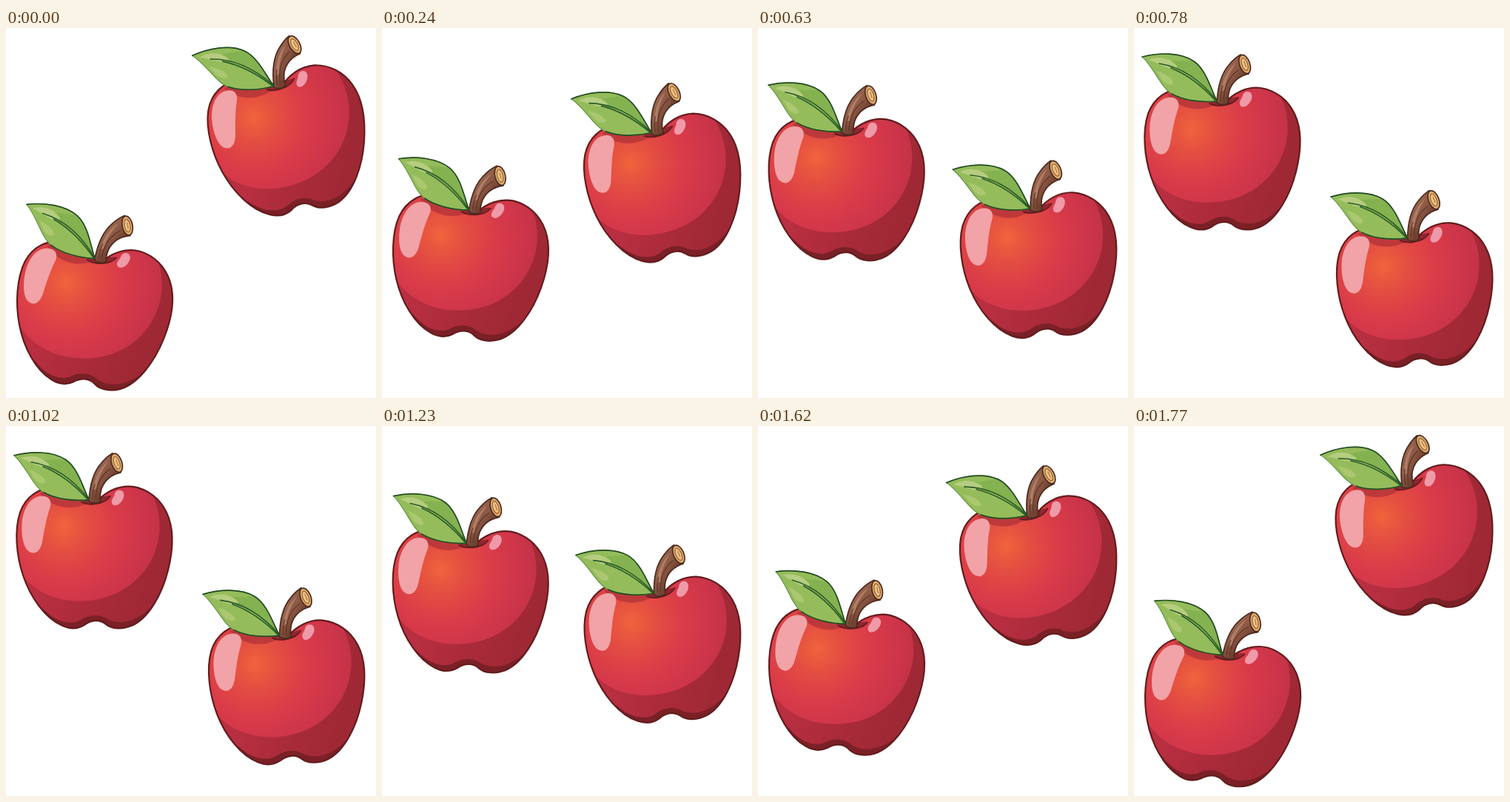
An HTML page for the animation above (1.8 s loop, 500 by 500 pixels).

```html
<!DOCTYPE html>
<html lang="en">
<head>
<meta charset="utf-8">
<title>Bouncing apples</title>
<style>
  html, body { margin: 0; width: 100%; height: 100%; overflow: hidden; background: #fff; }
  svg { display: block; width: 100vw; height: 100vh; }
</style>
</head>
<body>
<svg viewBox="0 0 500 500">
  <defs>
    <radialGradient id="skin" gradientUnits="userSpaceOnUse" cx="78" cy="136" r="148">
      <stop offset="0" stop-color="#f0643d"/>
      <stop offset=".1" stop-color="#ea593e"/>
      <stop offset=".27" stop-color="#e24a43"/>
      <stop offset=".5" stop-color="#d93b49"/>
      <stop offset=".75" stop-color="#cd354a"/>
      <stop offset="1" stop-color="#bb3047"/>
    </radialGradient>
    <linearGradient id="shade" gradientUnits="userSpaceOnUse" x1="50" y1="205" x2="185" y2="250">
      <stop offset="0" stop-color="#b92f42"/>
      <stop offset=".5" stop-color="#ab2b3b"/>
      <stop offset="1" stop-color="#9f2835"/>
    </linearGradient>
    <linearGradient id="bark" gradientUnits="userSpaceOnUse" x1="116" y1="62" x2="138" y2="78">
      <stop offset="0" stop-color="#9a6650"/>
      <stop offset=".55" stop-color="#8c5844"/>
      <stop offset="1" stop-color="#70412f"/>
    </linearGradient>
    <path id="body" d="M121 103 C108 92 86 84 66 83 C45 82 27 94 19 116
      C11 140 14 174 23 201 C33 231 53 259 76 269 C87 274 98 273 106 268
      C115 261 127 260 135 267 C143 274 158 274 170 269 C193 259 211 226 219 194
      C226 166 227 137 217 116 C208 97 191 84 171 81 C153 79 135 87 121 103Z"/>
    <path id="blade" d="M11 39 C34 33 63 33 81 45 C97 56 104 82 112 99
      C91 101 67 98 51 89 C36 80 28 55 11 39Z"/>
    <clipPath id="inBody"><use href="#body"/></clipPath>
    <clipPath id="inLeaf"><use href="#blade"/></clipPath>

    <g id="apple" fill="none" stroke-linecap="round" stroke-linejoin="round">
      <use href="#body" fill="url(#skin)"/>
      <g clip-path="url(#inBody)">
        <path fill="url(#shade)" d="M20 198 C42 230 86 243 130 232
          C174 221 203 185 207 145 C209 126 206 110 198 92 L240 90 V285 H20Z"/>
        <path fill="#7b2027" d="M50 246 C66 263 86 269 100 262 C113 253 128 253 139 261
          C157 269 179 262 197 243 L200 290 H50Z"/>
        <path fill="#b53439" opacity=".8" d="M45 90 C60 108 84 114 104 106 L122 104 L95 80Z"/>
        <path fill="#8f2630" d="M101 102 C110 108 131 107 141 93 L128 95 L112 97Z"/>
      </g>
      <use href="#body" stroke="#631c1d" stroke-width="2.2"/>
      <path stroke="#631c1d" stroke-width="1.8" d="M102 102 C111 107 133 106 141 94"/>
      <path fill="#f1a3a7" d="M47 94 C57 93 62 99 60 108 C54 125 52 139 49 156
        C46 170 38 174 30 168 C22 161 20 141 22 126 C25 108 34 95 47 94Z"/>
      <path fill="#ef9aa8" d="M152 86 C159 85 161 92 158 98 C155 104 150 108 145 106
        C141 103 143 98 146 94 C147 90 148 87 152 86Z"/>

      <path fill="url(#bark)" stroke="#4b2a20" stroke-width="1.7" d="M112 101
        C113 79 118 61 129 49 C134 43 139 39 144 36 L155 62
        C142 65 133 73 129 84 C127 91 127 97 128 101 C123 105 116 104 112 101Z"/>
      <path fill="#ad7d65" d="M117 86 C120 69 127 55 138 47 C130 59 124 70 122 84Z"/>
      <path stroke="#5d3528" stroke-width="1.2" d="M121 97 C122 79 129 65 141 57 M117 98 C117 90 118 84 120 78"/>
      <g transform="translate(149.6 49) rotate(-19)">
        <ellipse rx="7" ry="13.1" fill="#dfae6e" stroke="#4b2a20" stroke-width="1.7"/>
        <ellipse rx="3.9" ry="8.7" fill="#ecc285" stroke="#a0683a" stroke-width="1.4"/>
        <path stroke="#a0683a" d="M.5 -4 V4"/>
      </g>

      <use href="#blade" fill="#95bc5b"/>
      <g clip-path="url(#inLeaf)">
        <path fill="#85b250" d="M36 48 C66 53 88 69 112 99 L106 73 L88 43 C75 47 57 41 36 48Z"/>
        <path fill="#b5cd7f" d="M20 43 C34 37 48 41 57 50 C60 54 57 56 51 55 C40 53 32 47 20 43Z"/>
        <path fill="#abc870" d="M31 58 C42 62 52 68 53 75 C49 79 42 75 38 70Z"/>
      </g>
      <path stroke="#295b27" stroke-width="1.6" d="M34 48 C65 53 89 70 112 98 M50 54 C72 63 91 77 110 98"/>
      <use href="#blade" stroke="#5c9142" stroke-width="1.1"/>
      <path stroke="#244d24" stroke-width="1.7" d="M11 39 C34 33 63 33 81 45 C97 56 104 82 112 99 C91 101 67 98 51 89"/>
    </g>
  </defs>
  <use href="#apple" id="left"/>
  <use href="#apple" id="right"/>
</svg>
<script>
  const LOOP = 1800, STEP = 30, TURN = 30, END = 59.25;
  const apples = [
    { el: document.getElementById('left'), x: 119.5, y: [370, 124.2], tilt: [7.8, -1.2] },
    { el: document.getElementById('right'), x: 379.5, y: [134.2, 373.4], tilt: [-10.2, -1.2] }
  ];
  const mix = ([a, b], p) => a + (b - a) * p;

  // The return leg is slightly quicker than the outward one.
  function progress(ms) {
    const n = Math.floor((ms % LOOP) / STEP);
    return n < TURN ? n / TURN : Math.max(0, (END - n) / (END - TURN));
  }

  function draw(ms) {
    const p = progress(ms);
    for (const { el, x, y, tilt } of apples) {
      el.setAttribute('transform',
        `translate(${x} ${mix(y, p)}) rotate(${mix(tilt, p)}) translate(-119.5 -157)`);
    }
  }

  const start = performance.now();
  function tick() {
    draw(performance.now() - start);
    requestAnimationFrame(tick);
  }
  tick();
</script>
</body>
</html>
```
